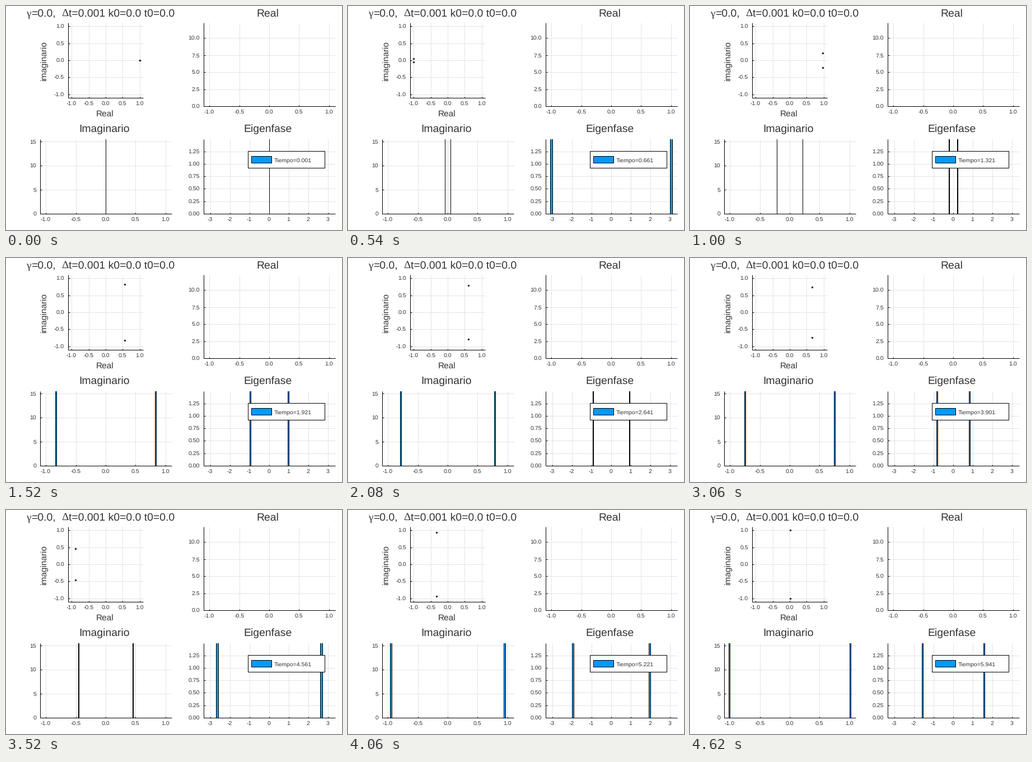
These frames come from a looping animation (600x400 px, 4.64 s). A matplotlib script:

```python
import math
import matplotlib.pyplot as plt
from matplotlib.animation import FuncAnimation
from matplotlib.patches import Rectangle

W, H, DPI = 600, 400, 100
PX = 72 / DPI
BLUE, INK, GRID = "#009AFA", "#333333", "#E4E4E4"
BASE = 371.5

plt.rcParams["font.family"] = "Liberation Sans"
plt.rcParams["text.hinting"] = "none"
fig = plt.figure(figsize=(W / DPI, H / DPI), dpi=DPI, facecolor="white")
ax = fig.add_axes([0, 0, 1, 1])
# Half a pixel of shift lets strokes at x.5 snap to their own pixel
ax.set_xlim(0.5, W + 0.5)
ax.set_ylim(H + 0.5, 0.5)
ax.axis("off")


def label(x, y, s, size, ha="center", **kw):
    return ax.text(x, y, s, fontsize=size * PX, color=INK, ha=ha,
                   va="baseline", **kw)


def line(x0, y0, x1, y1, color="black", z=2):
    ax.plot([x0, x1], [y0, y1], color=color, lw=PX, zorder=z,
            solid_capstyle="butt")


class Panel:
    """Plot area in pixels with a linear map from data values."""

    def __init__(self, box, origin, scale, xticks, yticks, xfmt, yfmt):
        self.left, self.top, self.right, self.bottom = box
        self.ox, self.oy = origin
        self.sx, self.sy = scale
        for v in xticks:
            x = self.x(v)
            line(x, self.top, x, self.bottom, GRID, 1)
            line(x, self.bottom, x, self.bottom - 2.5)
            label(x - 0.5, self.bottom + 13.5, xfmt % v, 10.5)
        for v in yticks:
            y = self.y(v)
            line(self.left, y, self.right, y, GRID, 1)
            line(self.left, y, self.left + 2.5, y)
            label(self.left - 7, y + 4, yfmt % v, 10.5, "right")
        line(self.left, self.bottom, self.right, self.bottom, z=4)
        line(self.left, self.top, self.left, self.bottom, z=4)

    def x(self, v):
        return self.ox + self.sx * v

    def y(self, v):
        return self.oy - self.sy * v


halves = [-1, -0.5, 0, 0.5, 1]
plane = Panel((111.5, 30.5, 245.5, 164.5), (178.5, 97.5), (60.6, 60.6),
              halves, halves, "%.1f", "%.1f")
Panel((353.5, 30.5, 588.5, 179.5), (470.5, 179.5), (106.8, 12.2),
      halves, [0, 2.5, 5, 7.5, 10], "%.1f", "%.1f")
imag = Panel((61.5, 238.5, 296.5, BASE), (178.5, BASE), (106.8, 8.6),
             halves, [0, 5, 10, 15], "%.1f", "%d")
phase = Panel((353.5, 238.5, 588.5, BASE), (470.5, BASE), (35.1, 89.2),
              range(-3, 4), [0.25 * i for i in range(6)], "%d", "%.2f")

# Titles and axis names
TITLE, NAME = 19.4, 15.4
label(37, 19, "γ", TITLE, "left", family="Liberation Serif")
label(46, 19, "=0.0,", TITLE, "left")
label(100, 19, "Δ", TITLE, "left", family="Liberation Serif")
label(113, 19, "t=0.001 k0=0.0 t0=0.0", TITLE, "left")
label(467.7, 19, "Real", TITLE)
label(176, 226, "Imaginario", TITLE)
label(468, 226, "Eigenfase", TITLE)
label(177, 198, "Real", NAME)
label(72.5, 98, "imaginario", NAME, rotation=90, rotation_mode="anchor")

# Legend
ax.add_patch(Rectangle((432.5, 259.5), 137, 30, fc="white", ec="black",
                       lw=PX, zorder=6))
ax.add_patch(Rectangle((438.5, 268.5), 36, 12, fc=BLUE, ec="black",
                       lw=PX, zorder=7))
clock = label(479.5, 279, "", 10.5, "left", zorder=7)

dots, = ax.plot([], [], "o", ms=2.2 * PX, mfc=BLUE, mec="black",
                mew=PX, zorder=5)


def make_bars(panel):
    bars = []
    for _ in range(2):
        bar = Rectangle((0, 200), 1, BASE - 200, fc=BLUE, ec="black",
                        lw=PX, zorder=3)
        ax.add_patch(bar)
        bar.set_clip_path(Rectangle(
            (panel.left, panel.top), panel.right - panel.left,
            BASE - panel.top + 1, transform=ax.transData))
        bars.append(bar)
    return bars


imag_bars, phase_bars = make_bars(imag), make_bars(phase)


def bin_width(span, bins):
    """Round span / bins to a 1-2-5 step."""
    raw = span / bins
    unit = 10.0 ** math.floor(math.log10(raw))
    r = raw / unit
    return unit * (1 if r <= 1.1 else 2 if r <= 2.2 else 5 if r <= 5.5 else 10)


def place_bars(panel, bars, v, bins):
    w = bin_width(2 * v, bins)
    for bar, value in zip(bars, (-v, v)):
        bar.set_x(panel.x(math.floor(value / w) * w))
        bar.set_width(w * panel.sx)


def draw(tick):
    # Steps last 20, 100 and 20 ms in turn
    step = 3 * (tick // 7) + (0, 1, 1, 1, 1, 1, 2)[tick % 7]
    t = 0.001 + 0.06 * step

    # Phase and norm of a linear ramp integrated to second order
    theta = math.sqrt(50) * t * (t + 0.001) + 1.18e-4 * t ** 4
    norm = math.exp(1e-6 * t ** 5)
    folded = abs((theta + math.pi) % (2 * math.pi) - math.pi)
    re, im = norm * math.cos(folded), norm * math.sin(folded)

    dots.set_data([plane.x(re)] * 2, [plane.y(im), plane.y(-im)])
    place_bars(imag, imag_bars, im, 100)
    place_bars(phase, phase_bars, folded, 60)
    clock.set_text("Tiempo=%.3f" % t)
    return [dots, clock, *imag_bars, *phase_bars]


anim = FuncAnimation(fig, draw, frames=232, interval=20, repeat=True,
                     repeat_delay=0, blit=False)
plt.show()
```
